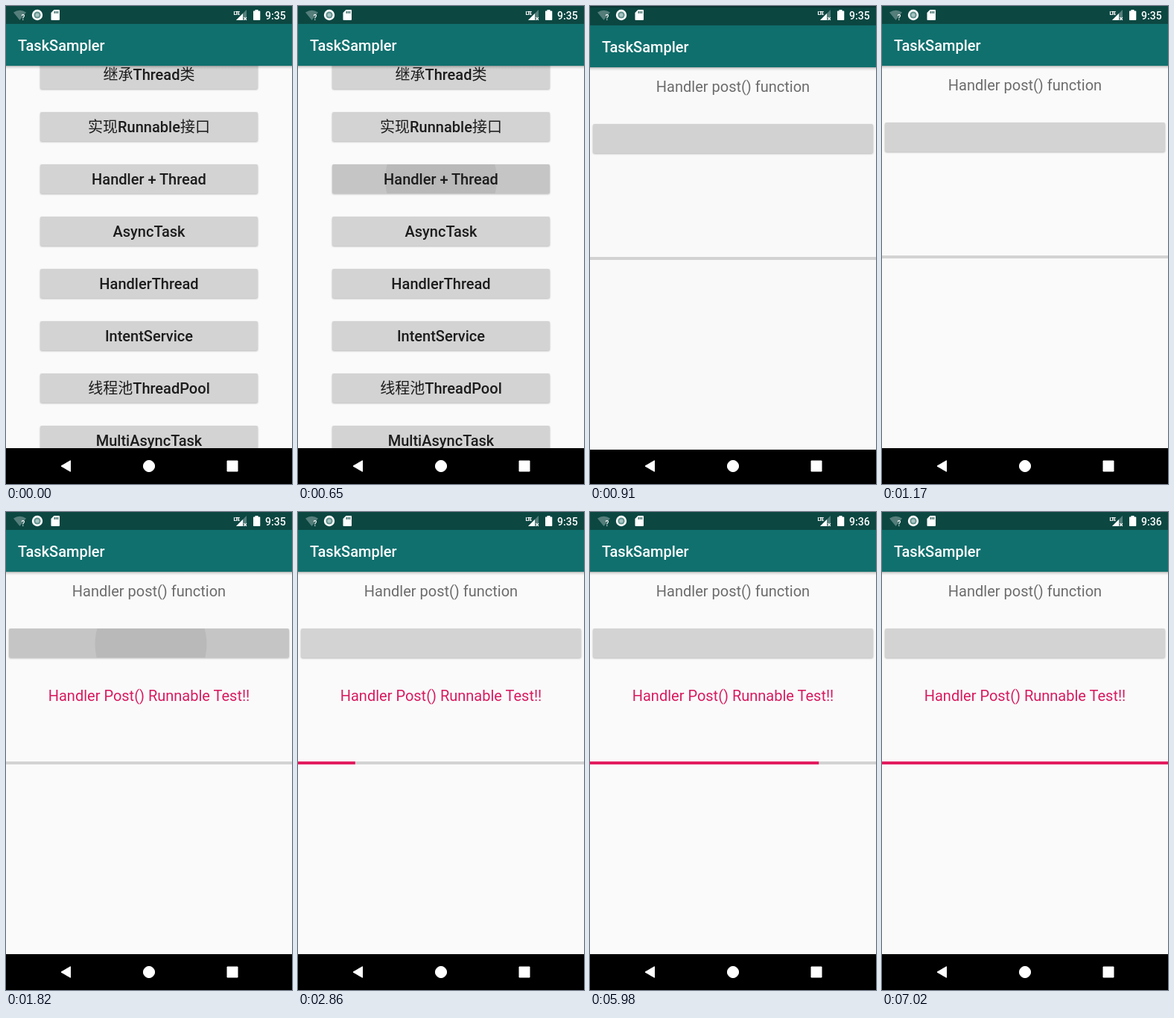
These frames come from a looping animation (384 px wide and 640 px high, 7150 ms). An HTML page:

```html
<!DOCTYPE html>
<html lang="zh">
<head>
<meta charset="utf-8">
<title>Thread demo</title>
<style>
  html, body { margin: 0; width: 100%; height: 100%; overflow: hidden; background: #000; }
  svg { display: block; width: 100%; height: 100%; }
  text { font: 20px Roboto, "Noto Sans CJK SC", "Noto Sans CJK", sans-serif; }
  .mid { text-anchor: middle; }
  .bold { font-weight: 500; }
  .han { font-weight: 400; }
  .btn { fill: #d3d3d3; filter: drop-shadow(0 1px 1px rgba(0, 0, 0, .28)); }
</style>
</head>
<body>
<svg id="stage" viewBox="0 0 384 640">
  <defs>
    <linearGradient id="shade" x2="0" y2="1">
      <stop offset="0" stop-opacity=".3"/>
      <stop offset=".4" stop-opacity=".1"/>
      <stop offset="1" stop-opacity="0"/>
    </linearGradient>
  </defs>
  <rect width="384" height="640"/>
  <g id="list"></g>
  <g id="page"></g>
  <g id="status" fill="#fff">
    <path d="M18.5 19 L10 8.6 Q18.5 3 27 8.6 Z" opacity=".3"/>
    <text class="bold" x="20.5" y="18.5" style="font-size:10px">?</text>
    <circle cx="42" cy="12" r="7.2"/>
    <circle cx="42" cy="12" r="4.6" fill="#5f908b"/>
    <circle cx="42" cy="12" r="2.6" fill="#a9c4c1"/>
    <path d="M64.5 5 H71 Q72 5 72 6 V18 Q72 19 71 19 H61.5 Q60.5 19 60.5 18 V9 Z"/>
    <path d="M65.2 7 v3 M67.4 7 v3 M69.6 7 v3" stroke="#0c4742" stroke-width="1.1"/>
    <text x="305.5" y="11.5" textLength="" style="font:bold 7.5px 'Roboto Condensed',Roboto,sans-serif;letter-spacing:-.9px">LTE</text>
    <path d="M323 5 V19 H309 Z" opacity=".3"/>
    <path d="M318 10 V19 H309 Z"/>
    <path d="M319.4 15.2 l3.6 3.6 m0 -3.6 l-3.6 3.6" stroke="#fff" stroke-width="1.2"/>
    <path d="M334.5 6.5 V5 H338.5 V6.5 H340.5 Q341.3 6.5 341.3 7.3 V18.2 Q341.3 19 340.5 19 H332.7 Q332 19 332 18.2 V7.3 Q332 6.5 332.7 6.5 Z"/>
    <text id="clock" class="bold" x="348" y="17.5" style="font-size:14px"></text>
  </g>
  <g fill="#fff" stroke="#fff" stroke-linejoin="round">
    <path d="M74 616 L86.5 608.7 V623.3 Z"/>
    <circle cx="192" cy="616" r="7.6"/>
    <rect x="297" y="609" width="14" height="14"/>
  </g>
</svg>
<script>
const LOOP = 7150, STEP = 130;
const $ = id => document.getElementById(id);
const set = (el, attrs) => { for (const k in attrs) el.setAttribute(k, attrs[k]); };
const clamp = v => Math.min(1, Math.max(0, v));

const labels = ['继承Thread类', '实现Runnable接口', 'Handler + Thread', 'AsyncTask',
  'HandlerThread', 'IntentService', '线程池ThreadPool', 'MultiAsyncTask'];

const box = (x, y, w, h, fill) => `<rect x="${x}" y="${y}" width="${w}" height="${h}" fill="${fill}"/>`;
const button = (x, y, w) => `<rect class="btn" x="${x}" y="${y}" width="${w}" height="39" rx="2"/>`;
const label = (y, fill, str, cls = '') =>
  `<text class="mid ${cls}" x="192" y="${y}" fill="${fill}">${str}</text>`;
const han = str => str.replace(/[\u4e00-\u9fff]+/g, '<tspan class="han">$&</tspan>');

// Touch feedback clipped to one button: a dim layer and a growing circle.
const ripple = (id, x, y, w, cx, cy) => `
  <clipPath id="${id}Clip"><rect x="${x}" y="${y}" width="${w}" height="39" rx="2"/></clipPath>
  <g id="${id}" clip-path="url(#${id}Clip)">
    <rect x="${x}" y="${y}" width="${w}" height="39" opacity=".066"/>
    <circle id="${id}Dot" cx="${cx}" cy="${cy}" opacity=".06"/>
  </g>`;

const screen = content =>
  box(0, 0, 384, 592, '#fafafa') + content +
  box(0, 80, 384, 5, 'url(#shade)') +
  box(0, 24, 384, 56, '#10706e') + box(0, 0, 384, 24, '#0c4742') +
  box(0, 592, 384, 60, '#000') +
  '<text class="bold" x="16" y="60" fill="#fff">TaskSampler</text>';

$('list').innerHTML = screen(
  labels.map((_, i) => button(46, 72 + 70 * i, 292)).join('') +
  ripple('tap', 46, 212, 292, 192, 232) +
  labels.map((s, i) => label(99 + 70 * i, '#1c1c1c', han(s), 'bold')).join(''));

$('page').innerHTML = screen(
  label(113, '#6c6c6c', 'Handler post() function') +
  button(4, 156, 376) + ripple('press', 4, 156, 376, 194.5, 177) +
  '<g id="result">' + label(253, '#d81b60', 'Handler Post() Runnable Test!!') + '</g>' +
  box(0, 334, 384, 4, '#d3d3d3') +
  '<rect id="bar" y="334" height="4" fill="#e31c5f"/>');

function drawRipple(id, t) {
  const k = t / STEP;
  set($(id), { opacity: k < 0 ? 0 : clamp((5 - k) / 4) });
  set($(id + 'Dot'), { r: Math.max(0, 25 + 50 * k) });
}

function render(now) {
  const t = Math.floor(now % LOOP / STEP) * STEP;

  // The new screen slides up with a quintic ease and fades in with a quartic one.
  const since = t - 718;
  const slide = 51.2 * (1 - clamp(since / 403)) ** 5;
  const fade = clamp(since / 250);
  set($('list'), { opacity: 1 - .3 * fade });
  set($('page'), {
    opacity: 1 - (1 - fade) ** 4,
    transform: `translate(0 ${Math.round(slide)})`
  });

  drawRipple('tap', t < 780 ? t - 520 : -1);
  drawRipple('press', t - 1690);
  set($('result'), { opacity: t >= 1820 ? 1 : 0 });

  const done = Math.max(0, Math.floor((t - 2860) / 1040) + 1);
  set($('bar'), { width: 76.8 * done });
  $('clock').textContent = t < 5330 ? '9:35' : '9:36';
}

const start = performance.now();
function tick() {
  render(performance.now() - start);
  requestAnimationFrame(tick);
}
tick();
</script>
</body>
</html>
```
